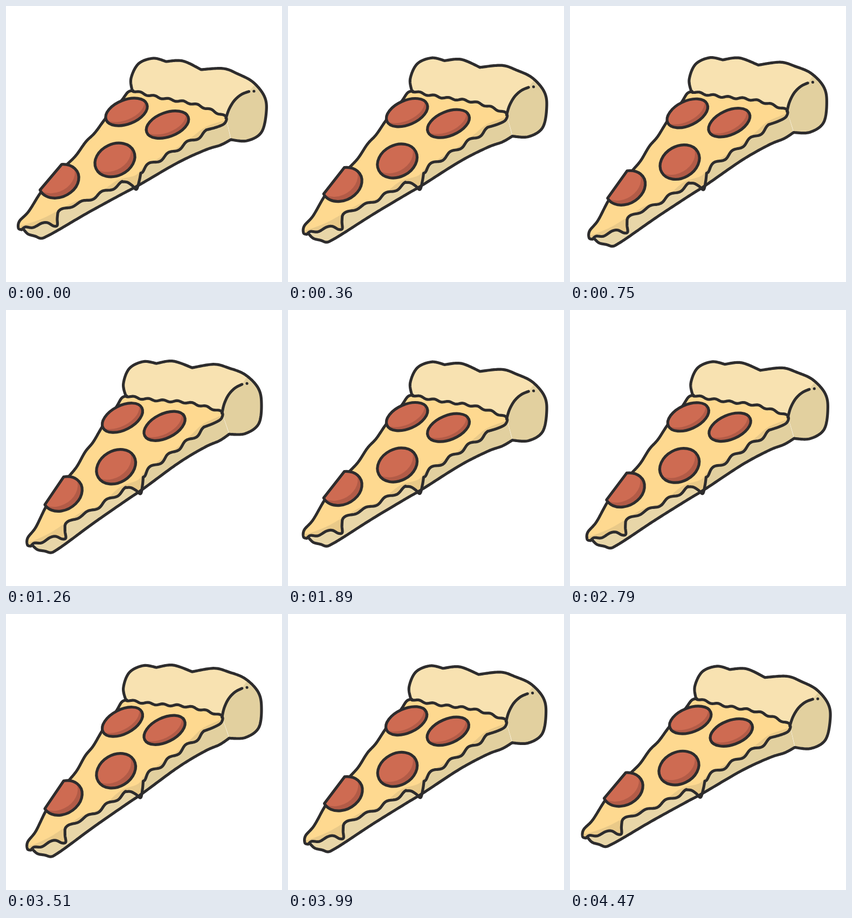
Recreate the animation shown at these times as an HTML page with a canvas. Size 512 px wide and 512 px high, loop 4.5 s.

```html
<!DOCTYPE html>
<html lang="en">
<head>
<meta charset="utf-8">
<title>Rocking pizza slice</title>
<style>
  html, body { margin: 0; height: 100%; overflow: hidden; background: #fff; }
  canvas { display: block; width: 512px; height: 512px; }
</style>
</head>
<body>
<canvas id="stage" width="512" height="512"></canvas>
<script>
const ctx = document.getElementById('stage').getContext('2d');
const TAU = 2 * Math.PI, RAD = Math.PI / 180;
const SWING = 2250, ANGLE = 7 * RAD, PIVOT = [252, 268];
const INK = '#2d2c2d', CRUST = '#f8e2b1', SIDE = '#e2d09f', SIDE_TIP = '#e8d6a8';
const CHEESE = '#fed990', CHEESE_SHADE = '#e9c988', MEAT = '#ce6b52', MEAT_SHADE = '#b25b47';

// Smooth curve through a few key points, optionally rippled along its length.
function curve(keys, wave = 1, height = 0) {
  const k = keys.split(' ').map(pair => pair.split(',').map(Number));
  const result = [];
  let length = 0;
  for (let i = 0; i < k.length - 1; i++) {
    const b = k[i], c = k[i + 1], a = k[i - 1] || b, d = k[i + 2] || c;
    const at = (t, n) => b[n] + t / 2 * (c[n] - a[n]
      + t * (2 * a[n] - 5 * b[n] + 4 * c[n] - d[n] + t * (3 * b[n] - a[n] - 3 * c[n] + d[n])));
    for (let t = 0; t < 1; t += 0.05) {
      const x = at(t, 0), y = at(t, 1);
      const dx = at(t + 0.05, 0) - x, dy = at(t + 0.05, 1) - y, step = Math.hypot(dx, dy);
      const offset = -height * Math.cos(TAU * length / wave) / step;
      result.push([x + dy * offset, y - dx * offset]);
      length += step;
    }
  }
  return result;
}

function outline(...runs) {
  const path = new Path2D();
  runs.flat().forEach(p => path.lineTo(...p));
  return path;
}

const rim = [
  curve('234,157 232,134 246,107 273,97 297,103'),
  curve('297,103 328,102 362,118'),
  curve('362,118 403,116 430,126 458,141 479,167 483,195 474,234 447,250 417,248')
];
const seam = curve('236,157 260,164 296,172 345,181 385,195 408,206', 27, 1.6);
const lowerEdge = [
  curve('408,206 409,211 404,219 390,225 371,230'),
  curve('373,233 353,245 325,261 292,281 262,297 250,307', 41, 3.2),
  curve('250,310 247,325 242,340 234,333 225,327 215,326'),
  curve('217,328 180,346 143,364 119,371 98,383', 42, 3),
  curve('96,384 95,395 95,407 88,408 77,402 66,403 50,411 36,410 29,415')
];
const leftEdge = curve('29,415 23,412 25,399 42,381 65,345 88,318 113,294 130,277 148,252 165,235 186,207 213,177 226,160 236,157');
const base = curve('417,248 398,258 370,267 318,291 247,332 215,349 151,384 98,415 76,427 65,431 54,427 41,423 33,415');
const fold = curve('408,208 414,191 424,175 437,164 451,158.5');
const glow = curve('406,212 371,224 345,243 317,263 258,297 240,314 205,324 166,352 130,362 92,382 68,394 46,402 25,408');

const bread = outline(base, [[408, 207]]);
const crust = outline(...rim, [...seam].reverse());
const crustSide = outline(fold, [[463, 144], [512, 144], [512, 260], [395, 260]]);
const cheese = outline(leftEdge, seam, ...lowerEdge);
cheese.closePath();
const cheeseLight = outline(leftEdge, seam, glow);
const openLines = [outline(base), outline(...rim), outline(fold)];

// A partial sweep leaves a slice cut off along a straight chord.
function pepperoni(x, y, rx, ry, tilt, from = 0, to = 360) {
  const shifted = (dx, dy) => {
    const path = new Path2D();
    path.ellipse(x + dx, y + dy, rx, ry, tilt * RAD, from * RAD, to * RAD);
    path.closePath();
    return path;
  };
  return { edge: shifted(0, 0), light: shifted(-ry / 4, -ry / 3.3) };
}
const toppings = [
  pepperoni(223.5, 196.5, 40.5, 22.5, -21),
  pepperoni(299.5, 220, 41, 22.5, -20),
  pepperoni(202, 285.5, 38.5, 29.5, -25),
  pepperoni(98, 325, 38.5, 29.5, -25, -62, 180)
];

function fill(path, color) {
  ctx.fillStyle = color;
  ctx.fill(path);
}

function shade(path, color, inner, innerColor) {
  fill(path, color);
  ctx.save();
  ctx.clip(path);
  fill(inner, innerColor);
  ctx.restore();
}

const tipHalf = new Path2D();
tipHalf.rect(0, 300, 246, 150);

function drawPizza() {
  shade(bread, SIDE, tipHalf, SIDE_TIP);
  shade(crust, CRUST, crustSide, SIDE);
  shade(cheese, CHEESE_SHADE, cheeseLight, CHEESE);
  [cheese, ...openLines].forEach(path => ctx.stroke(path));
  for (const { edge, light } of toppings) {
    shade(edge, MEAT_SHADE, light, MEAT);
    ctx.stroke(edge);
  }
  const dot = new Path2D();
  dot.arc(460, 158, 2.6, 0, TAU);
  fill(dot, INK);
}

function frame() {
  const phase = performance.now() % SWING / SWING;
  ctx.clearRect(0, 0, 512, 512);
  ctx.save();
  ctx.translate(...PIVOT);
  ctx.rotate(-ANGLE * (1 - Math.abs(2 * phase - 1)));
  ctx.translate(-PIVOT[0], -PIVOT[1]);
  ctx.strokeStyle = INK;
  ctx.lineWidth = 5.2;
  ctx.lineCap = ctx.lineJoin = 'round';
  drawPizza();
  ctx.restore();
  requestAnimationFrame(frame);
}
frame();
</script>
</body>
</html>
```
